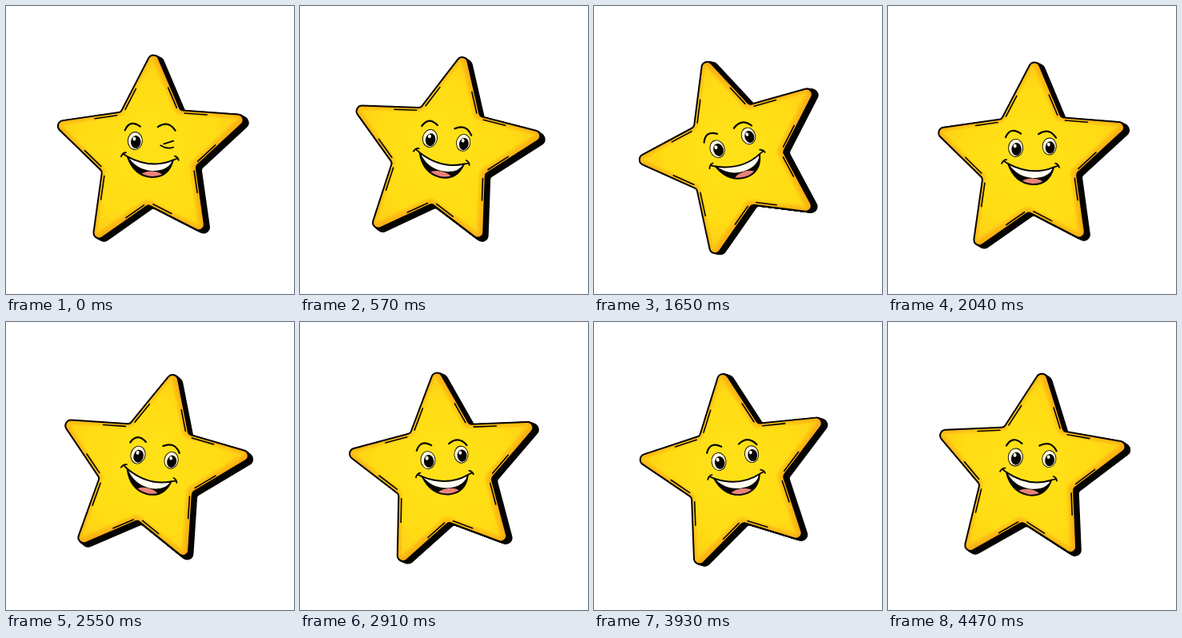
An HTML page with a canvas for the animation above (4500 ms loop, 360 by 360 pixels).

```html
<!DOCTYPE html>
<html lang="en">
<head>
<meta charset="utf-8">
<title>Swaying star</title>
<style>
  html, body { margin: 0; width: 100%; height: 100%; overflow: hidden; background: #fff; }
  canvas { display: block; width: 100vw; height: 100vh; object-fit: contain; }
</style>
</head>
<body>
<canvas id="stage" width="360" height="360"></canvas>
<script>
const ctx = document.getElementById('stage').getContext('2d');
const LOOP = 4500, STEP = 30, INK = '#050300';

// turning points of the sway: time, tilt in degrees
const TURNS = [[0, 1.3], [1100, 20.5], [1720, -20], [2310, 18], [3330, -18.7], [4900, 12.4]];

const TIPS = [[0, -132], [123, -50], [70, 100], [-72, 116], [-126, -36]];
// each notch is the midpoint of two tips, pulled towards the centre
const NOTCHES = TIPS.map(([x, y], i) => {
  const next = TIPS[(i + 1) % TIPS.length];
  return [0.3 * (x + next[0]) - 2, 0.3 * (y + next[1])];
});
const STAR = starPath();

function starPath() {
  const path = new Path2D();
  const corners = TIPS.flatMap((tip, i) => [tip, NOTCHES[i]]);
  const last = NOTCHES[NOTCHES.length - 1];
  path.moveTo((last[0] + TIPS[0][0]) / 2, (last[1] + TIPS[0][1]) / 2);
  corners.forEach((corner, i) => {
    path.arcTo(...corner, ...corners[(i + 1) % corners.length], i % 2 ? 5 : 7);
  });
  path.closePath();
  return path;
}

function tiltAt(t) {
  const i = TURNS.findIndex(turn => turn[0] > t);
  const [t0, a] = TURNS[i - 1], [t1, b] = TURNS[i];
  return a + (b - a) * (1 - Math.cos(Math.PI * (t - t0) / (t1 - t0))) / 2;
}

function centreAt(t) {
  const drift = Math.sin(2 * Math.PI * (t - 500) / 3100);
  const dip = Math.exp(-(((t - 2000) / 260) ** 2));
  return [180.3 - 2 * drift, 184 + 2.5 * t / LOOP + 8 * dip];
}

function line(d, width = 2) {
  ctx.lineWidth = width;
  ctx.strokeStyle = INK;
  ctx.stroke(new Path2D(d));
}

function oval(x, y, rx, ry, color) {
  ctx.beginPath();
  ctx.ellipse(x, y, rx, ry, 0, 0, Math.PI * 2);
  ctx.fillStyle = color;
  ctx.fill();
}

function thickness() {
  ctx.fillStyle = ctx.strokeStyle = INK;
  ctx.lineWidth = 2;
  for (let k = 1; k <= 7; k++) {
    ctx.save();
    ctx.translate(k * 0.88, k * 0.45);
    ctx.fill(STAR);
    ctx.stroke(STAR);
    ctx.restore();
  }
}

function shading() {
  ctx.save();
  ctx.clip(STAR);
  ctx.translate(-2, -1);
  for (let w = 3; w <= 15; w += 3) {
    ctx.lineWidth = w;
    ctx.strokeStyle = 'rgba(244, 142, 16, 0.13)';
    ctx.stroke(STAR);
  }
  ctx.restore();
}

// inked lines running from each notch along its two edges, just inside
function accents() {
  NOTCHES.forEach(([x, y], i) => {
    for (const tip of [TIPS[i], TIPS[(i + 1) % TIPS.length]]) {
      const along = s => [x * 0.94 + s * (tip[0] - x), y * 0.94 + s * (tip[1] - y)];
      line(`M${along(0.08)}L${along(0.4)}`, 1.6);
    }
  });
}

function body() {
  thickness();
  const glow = ctx.createRadialGradient(-6, -6, 20, 0, 0, 130);
  glow.addColorStop(0, '#ffe016');
  glow.addColorStop(0.6, '#ffdc14');
  glow.addColorStop(1, '#fdcb16');
  ctx.fillStyle = glow;
  ctx.fill(STAR);
  shading();
  accents();
  ctx.lineWidth = 2;
  ctx.strokeStyle = INK;
  ctx.stroke(STAR);
}

function eye(x, y) {
  oval(x, y, 9.5, 11.5, INK);
  oval(x, y, 8.6, 10.6, '#fff6dc');
  oval(x + 1, y + 1.5, 6.2, 8, INK);
  oval(x - 1, y - 2.5, 2, 2.4, '#fff');
}

function mouth() {
  const lips = new Path2D('M-30 5Q0 20 27 8Q22 30 1 30Q-21 29 -30 5Z');
  ctx.fillStyle = INK;
  ctx.fill(lips);
  ctx.save();
  ctx.clip(lips);
  oval(1, 30, 15, 7.5, '#e88378');
  ctx.fillStyle = '#fffdf2';
  ctx.fill(new Path2D('M-30 4Q0 20 27 7Q22 22 1 22Q-19 21 -30 4Z'));
  ctx.restore();
  ctx.lineWidth = 2;
  ctx.strokeStyle = INK;
  ctx.stroke(lips);
  line('M-38 5Q-36 0 -32 0M-35 2L-30 5M27 8L32 6M29 3Q33 4 34 8', 1.8);
}

function face(open) {
  eye(-21, -15);
  line('M-34 -28Q-28 -42 -15 -33', 2.2);
  line('M7 -33Q20 -42 29 -29', 2.2);
  if (open > 0.15) {
    ctx.save();
    ctx.translate(21, -18);
    ctx.scale(0.95, 0.95 * open);
    eye(0, 0);
    ctx.restore();
  } else {
    line('M11 -10Q19 -5 27 -8M15 -12L27 -16', 1.8);
  }
  mouth();
}

function draw(t) {
  ctx.setTransform(1, 0, 0, 1, 0, 0);
  ctx.fillStyle = '#fff';
  ctx.fillRect(0, 0, 360, 360);
  ctx.translate(...centreAt(t));
  ctx.rotate(tiltAt(t) * Math.PI / 180);
  ctx.lineCap = ctx.lineJoin = 'round';
  body();
  face(Math.min(1, Math.max(0, (t - 120) / 180)));
}

const start = performance.now();
function tick() {
  const t = (performance.now() - start) % LOOP;
  draw(Math.floor(t / STEP) * STEP);
  requestAnimationFrame(tick);
}
tick();
</script>
</body>
</html>
```
